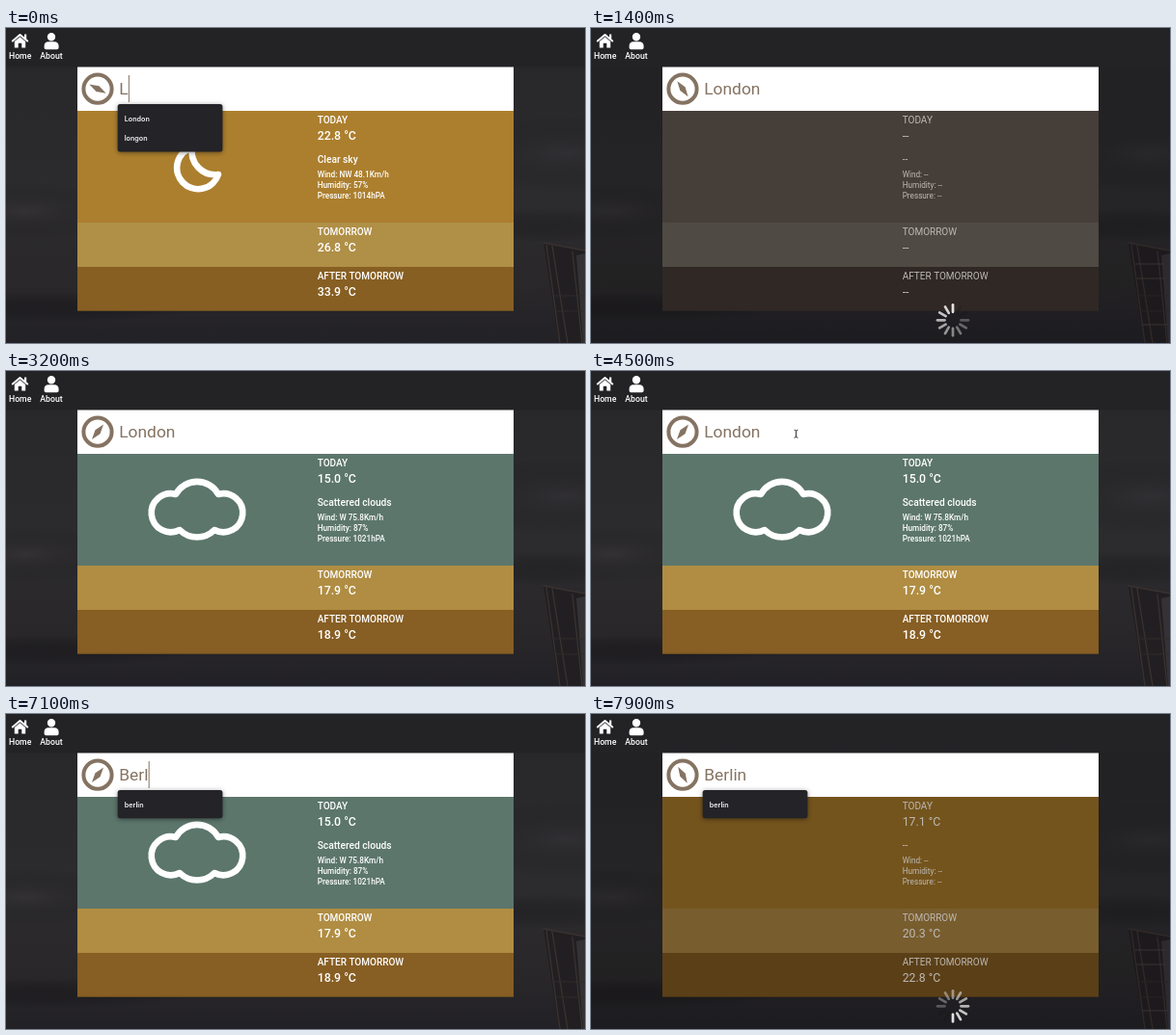
These frames come from a looping animation (600 px wide and 327 px high, 8 s). An HTML page with a canvas:

```html
<!DOCTYPE html>
<html lang="en">
<head>
<meta charset="utf-8">
<title>Weather search</title>
<style>
html, body { margin: 0; width: 100%; height: 100%; overflow: hidden; background: #262529; }
canvas { display: block; width: 600px; height: 327px; }
</style>
</head>
<body>
<canvas id="stage"></canvas>
<script>
const LOOP = 8000;
const canvas = document.getElementById('stage');
const ctx = canvas.getContext('2d');
const scale = window.devicePixelRatio || 1;
canvas.width = 600 * scale;
canvas.height = 327 * scale;

// Panel colours: today, tomorrow, after tomorrow
const DIM = '#bdb9b4', BROWN = '#857362';
const reports = [
  { from: 0, temps: ['22.8', '26.8', '33.9'], sky: 'Clear sky', icon: 'moon',
    wind: 'NW 48.1Km/h', humidity: '57%', pressure: '1014hPA', colors: ['#ac7f2e', '#b08f47', '#875f23'] },
  { from: 1000, loading: true, colors: ['#463e39', '#504a44', '#2f2825'] },
  { from: 1800, loading: true, temps: ['15.0', '17.9', '18.9'], colors: ['#3f4f4a', '#775b2d', '#5b3f17'] },
  { from: 2700, temps: ['15.0', '17.9', '18.9'], sky: 'Scattered clouds', icon: 'cloud',
    wind: 'W 75.8Km/h', humidity: '87%', pressure: '1021hPA', colors: ['#5c766c', '#b08d42', '#875e23'] },
  { from: 7500, loading: true, colors: ['#463e39', '#504a44', '#2f2825'] },
  { from: 7750, loading: true, temps: ['17.1', '20.3', '22.8'], colors: ['#74541d', '#785d2f', '#5b3f17'] }
];

const both = ['London', 'longon'];
const inputs = [
  { from: 0, text: 'L', list: both, caret: true },
  { from: 200, text: 'Lo', list: both, caret: true },
  { from: 350, text: 'Lon', list: both, caret: true },
  { from: 500, text: 'Lond', list: ['London'], caret: true },
  { from: 650, text: 'Londo', list: ['London'], caret: true },
  { from: 800, text: 'London', list: ['London'], caret: true },
  { from: 1000, text: 'London' },
  { from: 4850, text: 'L', list: both, caret: true },
  { from: 6200, text: '', caret: true },
  { from: 6600, text: 'B', list: ['berlin'], caret: true },
  { from: 6800, text: 'Be', list: ['berlin'], caret: true },
  { from: 6950, text: 'Ber', list: ['berlin'], caret: true },
  { from: 7100, text: 'Berl', list: ['berlin'], caret: true },
  { from: 7250, text: 'Berli', list: ['berlin'], caret: true },
  { from: 7400, text: 'Berlin', list: ['berlin'], caret: true },
  { from: 7500, text: 'Berlin', list: ['berlin'] }
];

// Needle heading in degrees over time
const needle = [[0, -62], [900, -62], [1400, -35], [2600, 22], [2800, 38], [7400, 38], [7900, -29], [8000, -29]];

const at = (steps, t) => steps.findLast(s => s.from <= t);

function tween(keys, t) {
  const i = keys.findIndex(k => k[0] > t);
  const [t0, a] = keys[i - 1], [t1, b] = keys[i];
  return a + (b - a) * (t - t0) / (t1 - t0);
}

function rect(x, y, w, h, color) {
  ctx.fillStyle = color;
  ctx.fillRect(x, y, w, h);
}

function text(str, x, y, size, color, weight = 400, family = 'Roboto') {
  ctx.font = `${weight} ${size}px ${family}, sans-serif`;
  ctx.fillStyle = color;
  ctx.fillText(str, x, y);
}

function stroke(d, color, width) {
  ctx.strokeStyle = color;
  ctx.lineWidth = width;
  ctx.stroke(new Path2D(d));
}

function fill(d, color) {
  ctx.fillStyle = color;
  ctx.fill(new Path2D(d));
}

function cloudBand(x, y, rx, ry, color) {
  ctx.save();
  ctx.translate(x, y);
  ctx.scale(rx, ry);
  const g = ctx.createRadialGradient(0, 0, 0, 0, 0, 1);
  g.addColorStop(0, color);
  g.addColorStop(1, 'transparent');
  rect(-1, -1, 2, 2, g);
  ctx.restore();
}

function backdrop(loading) {
  const g = ctx.createLinearGradient(0, 40, 0, 327);
  g.addColorStop(0, '#28272a');
  g.addColorStop(.5, '#2c2b2e');
  g.addColorStop(.8, '#292729');
  g.addColorStop(1, '#222126');
  rect(0, 0, 600, 327, g);
  cloudBand(20, 190, 110, 30, 'rgba(66,62,64,.35)');
  cloudBand(580, 130, 130, 40, 'rgba(62,60,64,.3)');
  cloudBand(40, 290, 160, 16, 'rgba(20,19,22,.4)');
  cloudBand(560, 205, 90, 18, 'rgba(24,23,26,.35)');
  fill('M557 223L600 231V327H573Z', '#211f21');
  fill('M591 236L600 234V327H598Z', '#353235');
  stroke('M557 223L600 231M560 225L574 327M566 226L582 327M587 232L597 327', '#3a3130', 1.4);
  stroke('M568 278H600M571 294H600', '#302a2a', 1);
  if (loading) {
    rect(0, 40, 600, 287, 'rgba(0,0,0,.16)');
    stroke('M564 245H594M566 260H595M571 308H598', '#393332', 1);
  }
}

function nav() {
  rect(0, 0, 600, 40.5, '#232225');
  ctx.lineCap = ctx.lineJoin = 'round';
  stroke('M6.8 13.5L14.5 7L22.2 13.5', '#fff', 2);
  fill('M19 6.5h2.2v5h-2.2zM8.8 14L14.5 9.2L20.2 14V20.5H16.3V15.8H12.7V20.5H8.8Z', '#fff');
  fill('M47 5a4.2 4.2 0 1 1 0 8.4a4.2 4.2 0 1 1 0-8.4M44 14.2h6q4.6 0 4.6 4.6v1.6q0 1.8-1.8 1.8H41.4q-1.8 0-1.8-1.8v-1.6q0-4.6 4.4-4.6Z', '#fff');
  text('Home', 3, 31.7, 8.7, '#fff', 500);
  text('About', 35.3, 31.7, 8.7, '#fff', 500);
}

function compass(angle) {
  ctx.save();
  ctx.translate(95, 63.2);
  ctx.strokeStyle = BROWN;
  ctx.lineWidth = 4;
  ctx.beginPath();
  ctx.arc(0, 0, 14.6, 0, 7);
  ctx.stroke();
  ctx.rotate(angle * Math.PI / 180);
  fill('M0-9.8L3.2 0L0 9.8L-3.2 0Z', BROWN);
  ctx.restore();
}

const icons = {
  moon: 'M193 124A24 24 0 0 0 220 152A22 22 0 1 1 193 124Z',
  cloud: 'M176 128A25 25 0 0 1 220 128A20 20 0 1 1 216 165A25.4 25.4 0 0 1 180 165A20 20 0 1 1 176 128Z'
};

function panel(r) {
  const color = r.loading ? DIM : '#fff';
  const weight = r.loading ? 400 : 500;
  const line = (str, y, size) => text(str, 322.7, y, size, color, weight);
  const temp = i => r.temps ? r.temps[i] + ' °C' : '--';
  rect(74, 40.5, 452, 45.5, '#fff');
  rect(74, 86, 452, 116, r.colors[0]);
  rect(74, 202, 452, 46, r.colors[1]);
  rect(74, 248, 452, 45.7, r.colors[2]);
  line('TODAY', 98.8, 10);
  line(temp(0), 116, 12.3);
  line(r.sky || '--', 140, 10.2);
  line('Wind: ' + (r.wind || '--'), 155.4, 8.2);
  line('Humidity: ' + (r.humidity || '--'), 166, 8.2);
  line('Pressure: ' + (r.pressure || '--'), 176.7, 8.2);
  line('TOMORROW', 214.8, 10);
  line(temp(1), 232, 12.3);
  line('AFTER TOMORROW', 260.6, 10);
  line(temp(2), 277.6, 12.3);
  if (r.icon) stroke(icons[r.icon], '#fff', 6.6);
}

function search(s, t) {
  text(s.text, 117.2, 69.2, 17.4, BROWN);
  if (s.caret && (t - s.from) % 1000 < 500) {
    rect(117.5 + ctx.measureText(s.text).width, 49, 1, 28, BROWN);
  }
  if (!s.list) return;
  ctx.save();
  ctx.shadowColor = 'rgba(0,0,0,.45)';
  ctx.shadowBlur = 5 * scale;
  ctx.shadowOffsetY = scale;
  ctx.fillStyle = '#232328';
  ctx.beginPath();
  ctx.roundRect(115.7, 79, 108.7, 9 + 20.3 * s.list.length, 2.5);
  ctx.fill();
  ctx.restore();
  s.list.forEach((name, i) => text(name, 122.7, 96.7 + 20.3 * i, 7.2, '#f0f0f0', 600, 'Inter'));
}

function spinner(t) {
  const head = Math.floor(t * 12 / 1000) - 4;
  ctx.save();
  ctx.translate(375, 303.3);
  for (let i = 0; i < 12; i++) {
    const age = ((head - i) % 12 + 12) % 12;
    ctx.save();
    ctx.rotate(i * Math.PI / 6);
    ctx.globalAlpha = 1 - age * .078;
    stroke('M0-8.5V-16', age > 9 ? '#111' : '#e4e2e1', 2.7);
    ctx.restore();
  }
  ctx.restore();
}

function draw(now) {
  const t = now % LOOP;
  const report = at(reports, t);
  ctx.setTransform(scale, 0, 0, scale, 0, 0);
  backdrop(report.loading);
  nav();
  panel(report);
  compass(tween(needle, t));
  search(at(inputs, t), t);
  if (report.loading) spinner(t);
  if (t >= 4200 && t < 4850) stroke('M211 61.2q1.5 0 1.5 1.3V68q0 1.3-1.5 1.3M214 61.2q-1.5 0-1.5 1.3M212.5 68q0 1.3 1.5 1.3', '#222', .9);
  requestAnimationFrame(draw);
}
requestAnimationFrame(draw);
</script>
</body>
</html>
```
